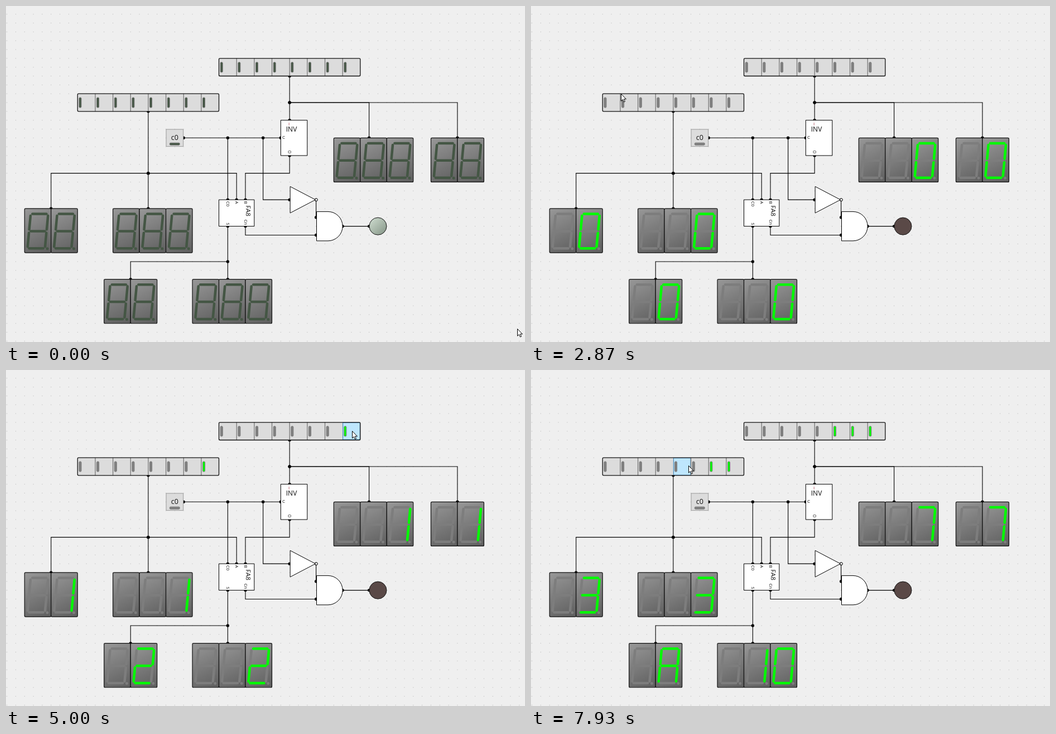
Recreate the animation shown at these times as an HTML page with a canvas. Size 930 by 602 pixels, loop 8000 ms.

```html
<!DOCTYPE html>
<html lang="en">
<head>
<meta charset="utf-8">
<title>Adder circuit</title>
<style>
html, body { margin: 0; width: 100%; height: 100%; overflow: hidden; background: #efefef; }
canvas { display: block; }
</style>
</head>
<body>
<canvas id="stage" width="930" height="602"></canvas>
<script>
const c = document.getElementById('stage').getContext('2d');
const TICKS = 120, LOOP = 8000, START = 27;
const UNIT = 15.83, CELL = 2 * UNIT, DIGIT = 3 * UNIT;
const FONT = '"Open Sans", "Noto Sans", sans-serif';

// Every part sits on a square grid
const gx = n => 1.6 + n * UNIT;
const gy = n => 14.7 + n * UNIT;

const triangle = new Path2D(`M${gx(32) + 1} ${gy(19.5)}V${gy(22.5)}L554.5 ${gy(21)}Z`);
const andGate = new Path2D('M556.5 368.4H577A26.2 26.2 0 0 1 577 420.8H556.5Z');
const arrow = new Path2D('M.5 .5V13.2L3.4 10.5L5.4 15L7.5 14.1L5.5 9.8H9.4Z');

// Segments a to g, each from column,row to column,row of a slanted digit
const segments = ['0010', '1011', '1112', '0212', '0102', '0001', '0111'];
const glyphs = { 0: 'abcdef', 1: 'bc', 2: 'abged', 3: 'abgcd', 4: 'fgbc', 7: 'abc', 8: 'abcdefg', A: 'abcefg' };
const corner = (col, row) => [11 + col * 31.3 - row * 2.9, 9.6 + row * 30.9];

// Cursor moves: departure tick, arrival tick, x, y
const moves = [
  [0, 4, 839, 484], [6, 10, 683, 425], [10, 13, 740, 557], [32, 33, 508, 376], [33, 34, 429, 334],
  [36, 41, 128, 148], [41, 43, 161, 157], [43, 49, 361, 172], [57, 69, 620, 109], [80, 83, 587, 112],
  [90, 93, 563, 113], [97, 108, 334, 171], [113, 116, 285, 172], [117, 119, 282, 171]];

const clicks = [
  { bar: 'a', bit: 1, down: 52, up: 55 },
  { bar: 'b', bit: 1, down: 72, up: 75 },
  { bar: 'b', bit: 2, down: 87, up: 88 },
  { bar: 'b', bit: 4, down: 93, up: 96 },
  { bar: 'a', bit: 2, down: 109, up: 111 }];

function valueOf(bar, k) {
  return clicks.reduce((sum, p) => sum + (p.bar === bar && k >= p.down ? p.bit : 0), 0);
}

function cursorAt(k) {
  if (k > 13 && k < 33) return null;
  let x = 916, y = 578;
  for (const [from, to, toX, toY] of moves) {
    const f = Math.min(1, Math.max(0, (k - from) / (to - from)));
    const eased = 1 - (1 - f) ** 1.8;
    x += (toX - x) * eased;
    y += (toY - y) * eased;
  }
  return [x, y];
}

function roundBox(x, y, w, h, r, fill, stroke, width = 1) {
  c.beginPath();
  c.roundRect(x, y, w, h, r);
  if (fill) { c.fillStyle = fill; c.fill(); }
  if (stroke) { c.strokeStyle = stroke; c.lineWidth = width; c.stroke(); }
}

function disc(x, y, r, fill, stroke) {
  c.beginPath();
  c.arc(x, y, r, 0, 7);
  c.fillStyle = fill;
  c.fill();
  if (stroke) { c.strokeStyle = stroke; c.lineWidth = 1; c.stroke(); }
}

function shape(p) {
  c.fillStyle = '#fff';
  c.fill(p);
  c.strokeStyle = '#000';
  c.lineWidth = 1;
  c.stroke(p);
}

function shade(x, y, w, h, from, to) {
  const g = c.createLinearGradient(x, y, x + w, y + h);
  g.addColorStop(0, from);
  g.addColorStop(1, to);
  return g;
}

function label(text, x, y, size, turned, color = '#111') {
  c.save();
  c.translate(x, y);
  if (turned) c.rotate(Math.PI / 2);
  c.font = `${size}px ${FONT}`;
  c.textAlign = 'center';
  c.textBaseline = 'middle';
  c.fillStyle = color;
  c.fillText(text, 0, 0);
  c.restore();
}

// Runs vertically to row mid, across, then vertically to the end; a dot marks both ends
function wire(x0, y0, x1, y1, mid = y0) {
  c.beginPath();
  c.moveTo(gx(x0), gy(y0));
  c.lineTo(gx(x0), gy(mid));
  c.lineTo(gx(x1), gy(mid));
  c.lineTo(gx(x1), gy(y1));
  c.strokeStyle = '#000';
  c.lineWidth = 1.1;
  c.stroke();
  disc(gx(x0), gy(y0), 2.7, '#000');
  disc(gx(x1), gy(y1), 2.7, '#000');
}

function switches(col, row, value, on, cursor, pressed) {
  const x = gx(col), y = gy(row);
  roundBox(x, y, CELL * 8, CELL, 2, '#dcdcdc');
  for (let i = 0; i < 8; i++) {
    const left = x + i * CELL;
    const hover = cursor && cursor[0] >= left && cursor[0] < left + CELL && cursor[1] > y + 1 && cursor[1] < y + CELL;
    if (hover) {
      roundBox(left + .5, y + .5, CELL - 1, CELL - 1, 0, pressed ? '#c4e5f6' : '#bee6fd', pressed ? '#2c628b' : '#3c7fb1');
    } else if (i) {
      c.fillStyle = '#777';
      c.fillRect(left - .6, y, 1.3, CELL);
    }
    const lit = value >> (7 - i) & 1;
    roundBox(left + 2.7, y + 6.9, 4, 18, 1.6, !on ? '#445644' : lit ? '#0f0' : '#808080', '#777');
  }
  roundBox(x, y, CELL * 8, CELL, 2, null, '#111', 1.3);
}

function display(col, row, count, value, base, on) {
  const y = gy(row), text = value.toString(base).toUpperCase().padStart(count);
  const off = on ? '#7d7d7d' : '#445644';
  for (let i = 0; i < count; i++) {
    const x = gx(col) + i * DIGIT, lit = on ? glyphs[text[i]] || '' : '';
    roundBox(x, y, DIGIT, 5 * UNIT, 2, shade(x, y, 40, 79, '#989898', '#606060'), '#111', 1.2);
    c.lineWidth = 4.5;
    c.lineCap = 'round';
    segments.forEach((s, n) => {
      const [x0, y0] = corner(s[0], s[1]), [x1, y1] = corner(s[2], s[3]);
      const f = 3.1 / Math.hypot(x1 - x0, y1 - y0), dx = (x1 - x0) * f, dy = (y1 - y0) * f;
      c.strokeStyle = lit.includes('abcdefg'[n]) ? '#0f0' : off;
      c.beginPath();
      c.moveTo(x + x0 + dx, y + y0 + dy);
      c.lineTo(x + x1 - dx, y + y1 - dy);
      c.stroke();
    });
    c.lineCap = 'butt';
    disc(x + 40.7, y + 71.9, 2.5, off);
  }
}

function grid() {
  c.fillStyle = '#efefef';
  c.fillRect(0, 0, 930, 602);
  c.fillStyle = '#b0b0b0';
  for (let j = 0; j < 38; j++)
    for (let i = 0; i < 59; i++) c.fillRect(gx(i) - .5, gy(j) - .5, 1, 1);
}

function wiring() {
  wire(32, 7, 32, 12);
  wire(32, 10, 41, 14);
  wire(32, 10, 51, 14);
  wire(16, 11, 16, 22);
  wire(16, 18, 5, 22);
  wire(16, 18, 26, 21);
  wire(20, 14, 31, 14);
  wire(25, 14, 25, 21);
  wire(29, 14, 32, 21, 21);
  wire(32, 16, 27, 21, 18);
  wire(25, 24, 25, 30);
  wire(25, 28, 14, 30);
  wire(27, 24, 35, 25, 25);
  wire(35, 21, 35, 23);
  wire(38, 24, 41, 24);
}

function parts(on) {
  roundBox(gx(18) + .5, gy(13) + .5, CELL - 1, CELL - 1, 0, '#dcdcdc', '#999');
  label('c0', gx(19), gy(14) + .5, 12.5);
  roundBox(293.3, 245.2, 18, 4, 1.6, on ? '#808080' : '#445644', '#777');

  roundBox(gx(31), gy(12), 3 * UNIT, 4 * UNIT, 0, '#fff', '#000');
  label('I', 507, 212, 8, false, '#a03040');
  label('INV', 511.5, 221.5, 12);
  label('C', 497.5, gy(14), 8);
  label('O', gx(32), 261.5, 8);

  roundBox(gx(24), gy(21), 4 * UNIT, 3 * UNIT, 0, '#fff', '#000');
  label('C0', gx(25), 354.5, 8, true);
  label('A', gx(26), 352, 8, true);
  label('B', gx(27), 352, 8, true);
  label('FA8', 432.5, 367, 11.5, true);
  label('S', gx(25), 390.5, 8, true);
  label('Cn', gx(27), 387.5, 8, true);

  shape(triangle);
  disc(gx(35) + .4, gy(21), 2.3, '#fff', '#000');
  shape(andGate);
  disc(gx(42), gy(24), 15.5, on ? '#5a4947' : shade(656, 383, 22, 23, '#c6d4c7', '#8d9d8f'), '#111');
}

function draw(now) {
  // The small offset keeps rounded times on the right tick
  const k = Math.floor((now % LOOP) * TICKS / LOOP + .1) % TICKS;
  const on = k >= START, cursor = cursorAt(k);
  const a = valueOf('a', k), b = valueOf('b', k);
  const pressed = clicks.some(p => k >= p.down && k < p.up);

  grid();
  wiring();
  parts(on);
  switches(24, 5, b, on, cursor, pressed);
  switches(8, 9, a, on, cursor, pressed);
  display(2, 22, 2, a, 16, on);
  display(12, 22, 3, a, 10, on);
  display(11, 30, 2, a + b, 16, on);
  display(21, 30, 3, a + b, 10, on);
  display(37, 14, 3, b, 10, on);
  display(48, 14, 2, b, 16, on);

  if (cursor) {
    c.save();
    c.translate(Math.round(cursor[0]), Math.round(cursor[1]));
    shape(arrow);
    c.restore();
  }
}

const begin = performance.now();
function tick() {
  draw(performance.now() - begin);
  requestAnimationFrame(tick);
}
tick();
</script>
</body>
</html>
```
